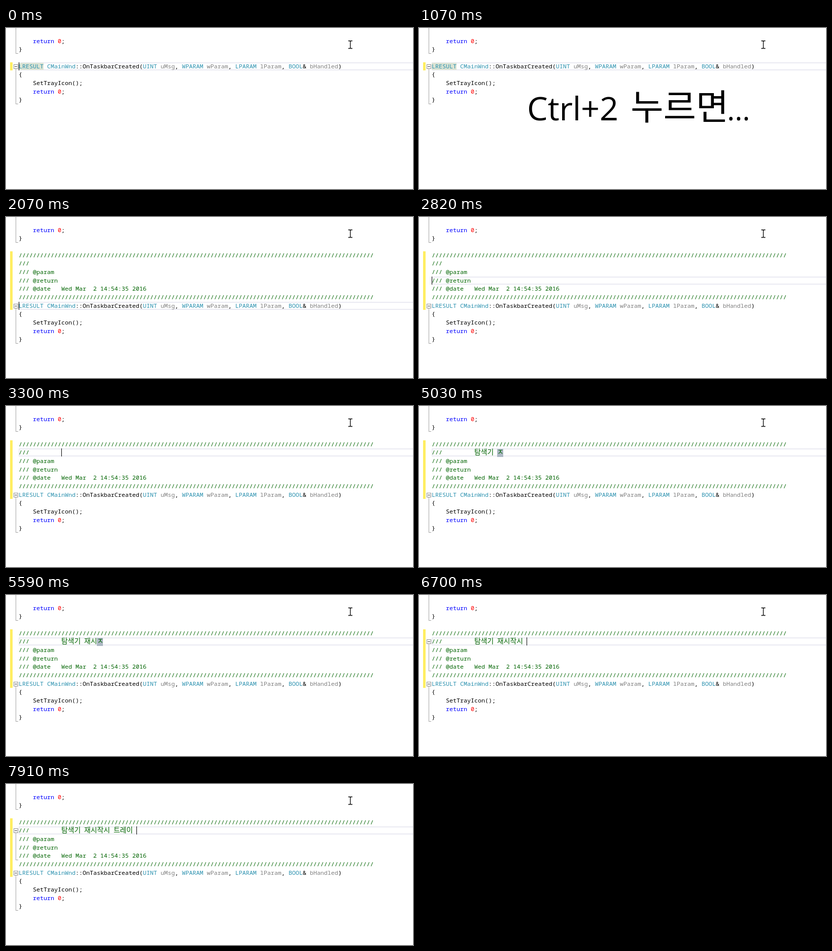
These frames come from a looping animation (802 px wide and 319 px high, 8000 ms). An HTML page:

```html
<!DOCTYPE html>
<html lang="ko">
<head>
<meta charset="utf-8">
<title>Comment macro</title>
<style>
  html, body { margin: 0; width: 100%; height: 100%; overflow: hidden; background: #fff; }
  svg { display: block; }
  text { white-space: pre; }
  .code { font: 11.67px "Noto Sans Mono", monospace; fill: #000; }
  .type { fill: #2b91af; }
  .param { fill: #808080; }
  .key { fill: #00f; }
  .num { fill: #f00; }
  .note { fill: #006400; }
  .hangul { font: 13.8px "Noto Sans CJK KR", "Noto Sans CJK", sans-serif; fill: #006400; }
  .latin { font: 64.5px "Open Sans", "Noto Sans", sans-serif; }
  .korean { font: 70px "Noto Sans CJK KR", "Noto Sans CJK", sans-serif; }
  .fold { fill: none; stroke: #a5a5a5; }
  .foldbox { fill: #fff; stroke: #909090; }
  rect, .fold, .foldbox { shape-rendering: crispEdges; }
</style>
</head>
<body>
<svg id="stage" width="802" height="319" viewBox="0 0 802 319"></svg>
<script>
const LOOP = 8000, LEFT = 25, CELL = 7, TYPE_X = 109, SYLLABLE = 12.7;
const stage = document.getElementById('stage');
const rowTop = r => Math.floor(68 + r * 50 / 3);

function add(parent, tag, attrs, content) {
  const node = document.createElementNS('http://www.w3.org/2000/svg', tag);
  for (const key in attrs) node.setAttribute(key, attrs[key]);
  if (content) node.textContent = content;
  return parent.appendChild(node);
}
const group = () => add(stage, 'g', {});
const show = (node, on) => node.setAttribute('visibility', on ? 'visible' : 'hidden');

// parts alternate: text, class, text, class ...
function line(parent, row, col, ...parts) {
  const text = add(parent, 'text', { class: 'code', x: LEFT + col * CELL, y: rowTop(row) + 12 });
  for (let i = 0; i < parts.length; i += 2)
    add(text, 'tspan', { class: parts[i + 1] || '' }, parts[i]);
}

function fold(parent, row, endRow) {
  const y = rowTop(row) + 4;
  add(parent, 'path', { class: 'fold', d: `M19.5 ${y + 9}V${rowTop(endRow) + 16.5}H24` });
  add(parent, 'rect', { class: 'foldbox', x: 15.5, y: y + .5, width: 8, height: 8 });
  add(parent, 'path', { d: `M17 ${y + 4.5}h5`, stroke: '#404040', 'shape-rendering': 'crispEdges' });
}

const modified = add(stage, 'rect', { x: 8, y: 68, width: 5, height: 16, fill: '#ffee62' });
const current = add(stage, 'rect', { x: 26, width: 790, height: 14, fill: 'none', stroke: '#eaeaf2', 'stroke-width': 2 });
const mark = add(stage, 'rect', { x: LEFT, y: 69, width: 49, height: 14, fill: '#dce4d4' });

// code above
add(stage, 'path', { class: 'fold', d: 'M19.5 0V50.5H24' });
line(stage, -3, 4, 'return', 'key', ' ', '', '0', 'num', ';');
line(stage, -2, 0, '}');

// function
const func = group();
fold(func, 0, 4);
line(func, 0, 0, 'LRESULT', 'type', ' ', '', 'CMainWnd', 'type', '::OnTaskbarCreated(', '',
  'UINT', 'type', ' uMsg', 'param', ', ', '', 'WPARAM', 'type', ' wParam', 'param', ', ', '',
  'LPARAM', 'type', ' lParam', 'param', ', ', '', 'BOOL', 'type', '& ', '', 'bHandled', 'param', ')');
line(func, 1, 0, '{');
line(func, 2, 4, 'SetTrayIcon();');
line(func, 3, 4, 'return', 'key', ' ', '', '0', 'num', ';');
line(func, 4, 0, '}');

// inserted comment
const comment = group();
const rule = '/'.repeat(100);
[rule, '///', '/// @param', '/// @return', '/// @date   Wed Mar  2 14:54:35 2016', rule]
  .forEach((s, row) => line(comment, row, 0, s, 'note'));
const outline = group();
fold(outline, 1, 4);

const compose = add(stage, 'rect', { y: 85, width: 12, height: 16, fill: '#adb8c4' });
const typed = add(stage, 'text', { class: 'hangul', y: 96 });
const caret = add(stage, 'rect', { width: 1, height: 16 });

const caption = group();
add(caption, 'text', { class: 'latin', x: 213, y: 183 }, 'Ctrl+2');
add(caption, 'text', { class: 'korean', x: 417, y: 182 }, '누르면');
add(caption, 'text', { class: 'latin', x: 607, y: 183, style: 'font-size:57px' }, '...');

// mouse pointer
add(stage, 'path', {
  d: 'M674.5 25.5h3l1 1l1-1h3M678.5 26.5v13M674.5 40.5h3l1-1l1 1h3',
  fill: 'none', stroke: '#000', 'stroke-width': 1.3
});

// each step changes part of the state; ime = last syllable is being composed
const key = (t, text) => [t, { text, ime: true, caret: false }];
const steps = [
  [0, { row: 0, caret: true, x: LEFT, text: '', ime: false, doc: false, caption: false, outline: false }],
  [520, { caret: false }],
  [1070, { caption: true }],
  [2070, { caption: false, doc: true, row: 6, caret: true }],
  [2460, { row: 5 }],
  [2660, { row: 4 }],
  [2820, { row: 3 }],
  [2950, { row: 2 }],
  [3090, { row: 1 }],
  [3300, { x: TYPE_X }],
  [3510, { caret: false }],
  [3820, { caret: true }],
  [3930, { caret: false }],
  key(4090, 'ㅌ'), key(4150, '타'), key(4300, '탐'),
  key(4420, '탐ㅅ'), key(4490, '탐새'), key(4650, '탐색'),
  key(4720, '탐색ㄱ'), key(4860, '탐색기'),
  [4940, { text: '탐색기 ', ime: false }],
  key(5020, '탐색기 ㅈ'), key(5090, '탐색기 재'),
  key(5390, '탐색기 재ㅅ'), key(5450, '탐색기 재시'),
  key(5590, '탐색기 재시ㅈ'), key(5670, '탐색기 재시자'), key(5860, '탐색기 재시작'),
  key(6130, '탐색기 재시작ㅅ'), key(6390, '탐색기 재시작시'),
  [6450, { text: '탐색기 재시작시 ', ime: false, outline: true }],
  [6700, { caret: true, x: 212 }],
  key(7250, '탐색기 재시작시 ㅌ'), key(7340, '탐색기 재시작시 트'),
  key(7430, '탐색기 재시작시 트ㄹ'), key(7510, '탐색기 재시작시 트레'),
  key(7650, '탐색기 재시작시 트레이'),
  [7910, { text: '탐색기 재시작시 트레이 ', ime: false, caret: true, x: 257 }]
];

function draw(s) {
  const top = rowTop(s.row);
  current.setAttribute('y', top + 1);
  caret.setAttribute('x', s.x);
  caret.setAttribute('y', top);
  modified.setAttribute('height', s.doc ? 116 : 16);
  func.setAttribute('transform', `translate(0 ${s.doc ? 100 : 0})`);

  let x = TYPE_X;
  const places = [...s.text].map(c => {
    const at = x;
    x += c === ' ' ? CELL : SYLLABLE;
    return at;
  });
  typed.setAttribute('x', places.join(' '));
  typed.textContent = s.text;
  if (s.ime) compose.setAttribute('x', Math.round(places[places.length - 1]));

  show(compose, s.ime);
  show(caret, s.caret);
  show(mark, !s.doc);
  show(comment, s.doc);
  show(outline, s.outline);
  show(caption, s.caption);
}

let shown = -1;
const start = performance.now();
function tick() {
  const t = (performance.now() - start) % LOOP;
  const count = steps.filter(([at]) => at <= t).length;
  if (count !== shown) {
    shown = count;
    draw(Object.assign({}, ...steps.slice(0, count).map(step => step[1])));
  }
  requestAnimationFrame(tick);
}
tick();
</script>
</body>
</html>
```
